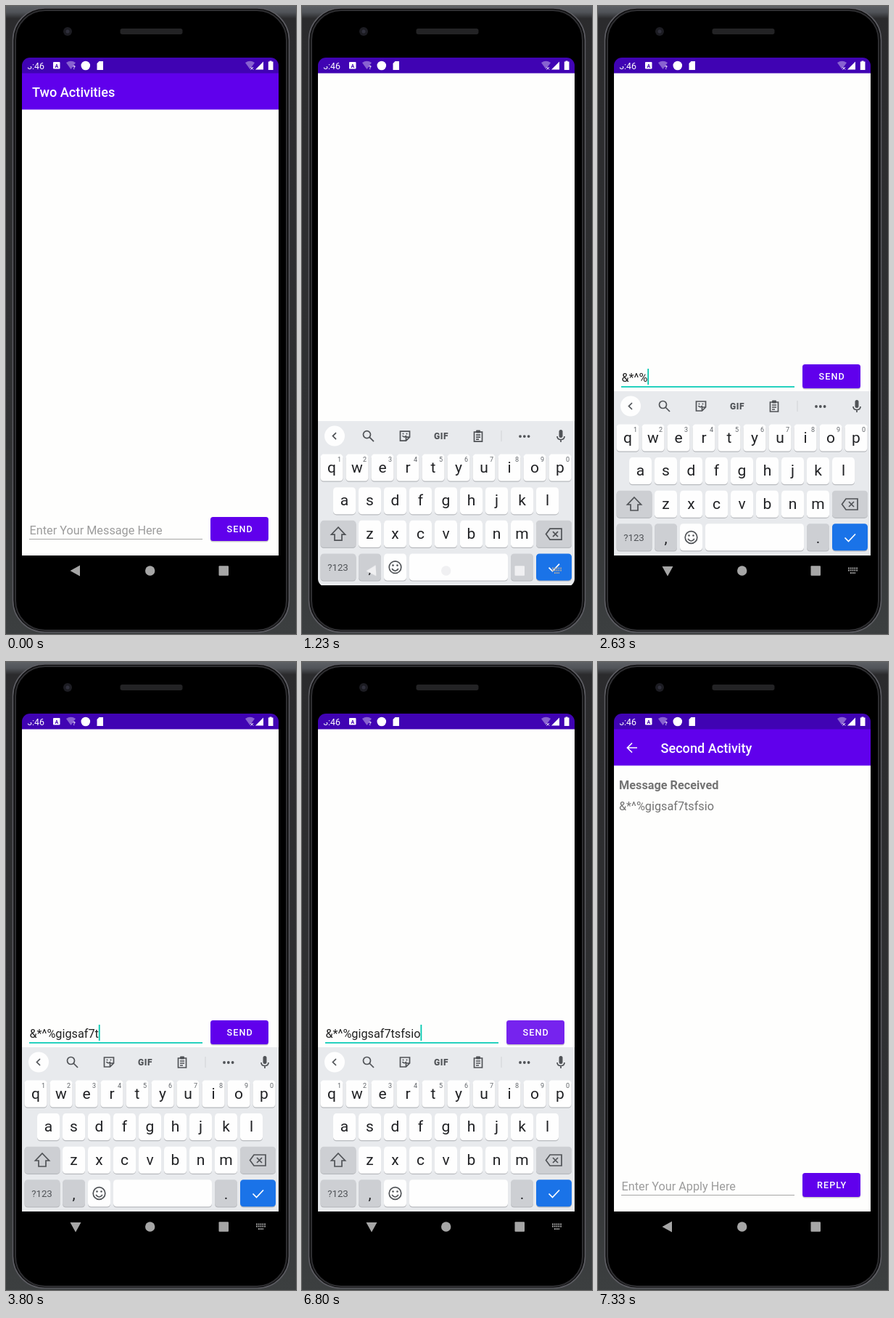
An HTML page that plays this animation: 400x864 px, repeating every 8000 ms.

```html
<!DOCTYPE html>
<html lang="en">
<head>
<meta charset="utf-8">
<title>Two Activities</title>
<style>
html, body { margin: 0; width: 100%; height: 100%; overflow: hidden; background: #2c2c2e; }
svg { display: block; width: 100%; height: 100%; font-family: Roboto, "Open Sans", sans-serif; }
.title { font-size: 18.1px; font-weight: 500; fill: #fff; }
.body { font-size: 16.25px; }
.hint { fill: #9c9c9c; }
.label { font-size: 12.6px; font-weight: 500; letter-spacing: .089em; fill: #fff; text-anchor: middle; }
.key { font-size: 21px; fill: #202124; text-anchor: middle; }
.digit { font-size: 9px; fill: #5f6368; text-anchor: middle; }
.line { fill: none; stroke: #505357; stroke-width: 1.7; }
.glyph { fill: #505357; }
.purple { fill: #6000ec; }
.rule { fill: #a6a6a6; }

#first, #pan, #keyboard, #second, #press, #nav, #back, #switcher {
  animation: 8s linear infinite both;
}
#first { animation-name: leave; transform-origin: 199px 435px; }
#pan { animation-name: pan; }
#keyboard { animation-name: slide, keyboard-fade; }
#second { animation-name: enter, second-fade; transform-origin: 199px 435px; }
#press { animation-name: press; }
#nav { animation-name: nav; }
#back { animation-name: turn; transform-origin: 96px 777px; }
#switcher { animation-name: switcher; }

@keyframes pan {
  0% { transform: translateY(0); }
  14.625% { transform: translateY(0); animation-timing-function: cubic-bezier(.25, .46, .45, .94); }
  17.75%, 100% { transform: translateY(-210px); }
}
@keyframes slide {
  0% { transform: translateY(269px); }
  14.11% { transform: translateY(269px); animation-timing-function: cubic-bezier(0, 0, .2, 1); }
  16.61%, 100% { transform: translateY(0); }
}
@keyframes keyboard-fade {
  0%, 14.11% { opacity: 0; }
  15.36%, 86.125% { opacity: 1; }
  87.375%, 100% { opacity: 0; }
}
@keyframes enter {
  0% { transform: scale(.85); }
  86.125% { transform: scale(.85); animation-timing-function: cubic-bezier(.3, 0, .8, .15); }
  86.96% { transform: scale(.91); animation-timing-function: cubic-bezier(.05, .7, .1, 1); }
  91.125%, 100% { transform: scale(1); }
}
@keyframes second-fade {
  0%, 86.75% { opacity: 0; }
  87.375%, 100% { opacity: 1; }
}
@keyframes leave {
  0% { transform: scale(1); }
  86.125% { transform: scale(1); animation-timing-function: cubic-bezier(.3, 0, .8, .15); }
  86.96% { transform: scale(1.06); animation-timing-function: cubic-bezier(.05, .7, .1, 1); }
  91.125%, 100% { transform: scale(1.15); }
}
@keyframes press {
  0%, 81.7% { opacity: 0; }
  84%, 100% { opacity: .14; }
}
@keyframes nav {
  0%, 14.2% { fill: #a6a6a6; }
  15%, 16% { fill: #f0f0f2; }
  16.6%, 100% { fill: #a6a6a6; }
}
@keyframes turn {
  0% { transform: rotate(0); }
  15.1% { transform: rotate(0); animation-timing-function: cubic-bezier(.4, 0, .2, 1); }
  17.6% { transform: rotate(-90deg); }
  86.125% { transform: rotate(-90deg); animation-timing-function: cubic-bezier(.4, 0, .2, 1); }
  88.6%, 100% { transform: rotate(0); }
}
@keyframes switcher {
  0%, 15.09% { opacity: 0; }
  15.1%, 86.12% { opacity: 1; }
  86.125%, 100% { opacity: 0; }
}
</style>
</head>
<body>
<svg viewBox="0 0 400 864" preserveAspectRatio="none">
  <defs>
    <linearGradient id="surround" x2="0" y2="1">
      <stop offset="0" stop-color="#5e6165"/>
      <stop offset=".01" stop-color="#505358"/>
      <stop offset=".02" stop-color="#2b2b2d"/>
      <stop offset=".7" stop-color="#303133"/>
      <stop offset="1" stop-color="#3c3f40"/>
    </linearGradient>
    <clipPath id="screen"><rect x="22" y="71" width="354" height="728" rx="11"/></clipPath>
    <clipPath id="content"><path d="M22 92H376V756H22Z"/></clipPath>
    <clipPath id="hour"><path d="M24 83H60V90H24ZM36.500 72H60V90H36.500Z"/></clipPath>
    <path id="wifi" d="M-6.500 -4Q0 -8.500 6.500 -4L0 5Z" fill="#fff" opacity=".38"/>
  </defs>

  <!-- Phone body -->
  <rect width="400" height="864" fill="url(#surround)"/>
  <rect x="9.500" y="3" width="381" height="858.500" rx="44" fill="#0c0c0d" stroke="#5c5c62" stroke-width="1.600"/>
  <rect x="13" y="6" width="374" height="853" rx="41" stroke="#2e2e31" stroke-width="2"/>
  <circle cx="85" cy="35" r="6" fill="#1c1c22"/>
  <circle cx="85" cy="35" r="2.500" fill="#30303c"/>
  <rect x="157.500" y="31" width="86" height="8" rx="3" fill="#232325"/>

  <g clip-path="url(#screen)">
    <g clip-path="url(#content)">
      <g id="first">
        <rect x="22" y="92" width="354" height="664" fill="#fefefd"/>
        <g id="pan">
          <rect class="purple" x="22" y="92" width="354" height="50.500"/>
          <text class="title" x="36" y="125">Two Activities</text>
          <text id="hint" class="body hint" x="32.500" y="726.500">Enter Your Message Here</text>
          <text id="typed" class="body" x="32.500" y="726.500" fill="#212121"></text>
          <rect id="underline" x="32" y="733" width="239"/>
          <rect id="caret" y="709" width="1.800" height="22" fill="#03c8b0"/>
          <rect x="282" y="704.500" width="80" height="33" rx="3.500" opacity=".2"/>
          <rect class="purple" x="282" y="703" width="80" height="33" rx="3.500"/>
          <rect id="press" x="282" y="703" width="80" height="33" rx="3.500" fill="#fff"/>
          <text class="label" x="322.700" y="724">SEND</text>
        </g>
      </g>
    </g>

    <g id="keyboard">
      <rect x="22" y="530" width="354" height="226" fill="#e8eaed"/>
      <g id="keys"></g>
      <circle cx="45" cy="550.500" r="14" fill="#fefefe"/>
      <g class="line">
        <path d="M47 546L42.500 550.500L47 555"/>
        <circle cx="89.500" cy="548.500" r="5"/>
        <path d="M93 552L99 558"/>
        <path d="M135.500 544H148.500V552L143.500 557H135.500ZM148.500 552H143.500V557M138.500 550Q141 553.500 144 550"/>
        <path d="M237.500 545H248.500V558H237.500ZM240 549H246M240 552H246M240 555H244"/>
        <path d="M275 543V558" opacity=".15" stroke-width="1"/>
        <path d="M352 551Q352 555.500 357 555.500T362 551M357 555.500V559"/>
        <path d="M50 676L59.500 686H55V694H45V686H40.500Z"/>
        <path d="M342 678H358V693H342L336.500 685.500ZM346 682L353 689M353 682L346 689"/>
        <circle cx="128.500" cy="731" r="8.300"/>
        <path d="M124 733Q128.500 739 133 733"/>
        <path d="M340.500 731.500L345.500 736.500L355 726.500" stroke="#fff"/>
      </g>
      <g class="glyph">
        <circle cx="139.500" cy="547.500" r="1"/><circle cx="144.500" cy="547.500" r="1"/>
        <rect x="240" y="542.500" width="6" height="4" rx="1"/>
        <circle cx="301" cy="551" r="1.900"/><circle cx="306.800" cy="551" r="1.900"/><circle cx="312.600" cy="551" r="1.900"/>
        <rect x="354.500" y="542" width="5" height="11" rx="2.500"/>
        <circle cx="125.500" cy="728.500" r="1.300"/><circle cx="131.500" cy="728.500" r="1.300"/>
        <text x="192" y="554.800" text-anchor="middle" font-size="12" font-weight="900" letter-spacing=".6">GIF</text>
        <text x="49.500" y="736" text-anchor="middle" font-size="13.300">?123</text>
      </g>
      <text class="key" x="93.500" y="739">,</text>
      <text class="key" x="303.500" y="739">.</text>
    </g>

    <g clip-path="url(#content)">
      <g id="second">
        <rect x="22" y="92" width="354" height="664" fill="#fefefd"/>
        <rect class="purple" x="22" y="92" width="354" height="50.500"/>
        <path d="M54 118H40.500M47 111.500L40.500 118L47 124.500" fill="none" stroke="#fff" stroke-width="1.700"/>
        <text class="title" x="86.500" y="125">Second Activity</text>
        <g class="body" fill="#737373">
          <text x="29" y="174.500" font-weight="700">Message Received</text>
          <text x="29" y="204">&amp;*^%gigsaf7tsfsio</text>
        </g>
        <text class="body hint" x="32.500" y="726.500">Enter Your Apply Here</text>
        <rect class="rule" x="32" y="733" width="239" height="1"/>
        <rect x="282" y="704.500" width="80" height="33" rx="3.500" opacity=".2"/>
        <rect class="purple" x="282" y="703" width="80" height="33" rx="3.500"/>
        <text class="label" x="322.700" y="724">REPLY</text>
      </g>
    </g>

    <!-- Status bar -->
    <rect x="22" y="71" width="354" height="21.500" fill="#4003b3"/>
    <g fill="#fff">
      <text x="29.200" y="86.500" font-size="12.300" clip-path="url(#hour)">3:46</text>
      <rect x="65" y="77" width="9.500" height="9.500" rx="1"/>
      <text x="69.800" y="84.500" font-size="7" font-weight="700" text-anchor="middle" fill="#4003b3">A</text>
      <use href="#wifi" x="89.500" y="82"/>
      <text x="92" y="87" font-size="7.500" font-weight="700">?</text>
      <circle cx="109.800" cy="82" r="6.300"/>
      <path d="M128.500 76H134V88H125.500V79Z"/>
      <use href="#wifi" x="336.500" y="82"/>
      <path d="M344 87.500H355V76.500Z"/>
      <path d="M363.500 76.500V75.500H366.500V76.500H368.500V88H361.800V76.500Z"/>
      <path d="M337.500 84L341 87.500M341 84L337.500 87.500" stroke="#fff"/>
    </g>

    <!-- Navigation bar -->
    <g id="nav">
      <path id="back" d="M88.500 777L102 769.500V784.500Z"/>
      <circle cx="198.700" cy="777" r="6.700"/>
      <rect x="293.500" y="770.300" width="13.500" height="13.500" rx="1"/>
      <path id="switcher" d="M345 773.500H358M345 776.500H358M348 780H355" stroke="#a6a6a6" stroke-width="1.800" stroke-dasharray="1.800 1"/>
    </g>
  </g>
</svg>
<script>
const LOOP = 8000, FOCUS = 870, TEXT_X = 32.5;
const MESSAGE = "&*^%gigsaf7tsfsio";
const KEY_TIMES = [1900, 2130, 2350, 2570, 2830, 3000, 3180, 3390, 3480, 3580, 3680, 3780, 3890, 4000, 4110, 4220, 4330];
const GREY = "#cdcfd3";
const $ = id => document.getElementById(id);

const cap = (x, row, width = 31, fill = "#fefefe") => {
  const y = 575.5 + row * 45.6;
  return `<rect x="${x}" y="${y + 1.2}" width="${width}" height="37" rx="4.5" fill="#b8babe"/>
    <rect x="${x}" y="${y}" width="${width}" height="37" rx="4.5" fill="${fill}"/>`;
};
const letterRow = (letters, left, row) => [...letters].map((letter, i) => {
  const x = left + i * 35, y = 600.5 + row * 45.6;
  const digit = row ? "" : `<text class="digit" x="${x + 26}" y="586">${(i + 1) % 10}</text>`;
  return cap(x, row) + `<text class="key" x="${x + 15.5}" y="${y}">${letter}</text>` + digit;
}).join("");

$("keys").innerHTML =
  letterRow("qwertyuiop", 25.5, 0) + letterRow("asdfghjkl", 43, 1) + letterRow("zxcvbnm", 78, 2) +
  cap(25.5, 2, 49, GREY) + cap(323, 2, 49, GREY) +
  cap(25.5, 3, 49, GREY) + cap(78, 3, 31, GREY) + cap(113, 3) +
  cap(148, 3, 136) + cap(288, 3, 31, GREY) + cap(323, 3, 49, "#1a73e8");

function draw(t) {
  const count = KEY_TIMES.filter(time => time <= t).length;
  const focused = t >= FOCUS;
  const lastInput = count ? KEY_TIMES[count - 1] : FOCUS;
  const typed = $("typed");
  typed.textContent = MESSAGE.slice(0, count);
  $("hint").style.opacity = count ? 0 : 1;
  $("underline").setAttribute("fill", focused ? "#10cdb8" : "#a6a6a6");
  $("underline").setAttribute("height", focused ? 1.8 : 1);
  const blinkOn = Math.floor((t - lastInput) / 500) % 2 === 0;
  $("caret").style.opacity = focused && blinkOn ? 1 : 0;
  $("caret").setAttribute("x", TEXT_X + (count ? typed.getComputedTextLength() : 0));
}

let start;
function tick(now) {
  start ??= now;
  draw((now - start) % LOOP);
  requestAnimationFrame(tick);
}
requestAnimationFrame(tick);
</script>
</body>
</html>
```
